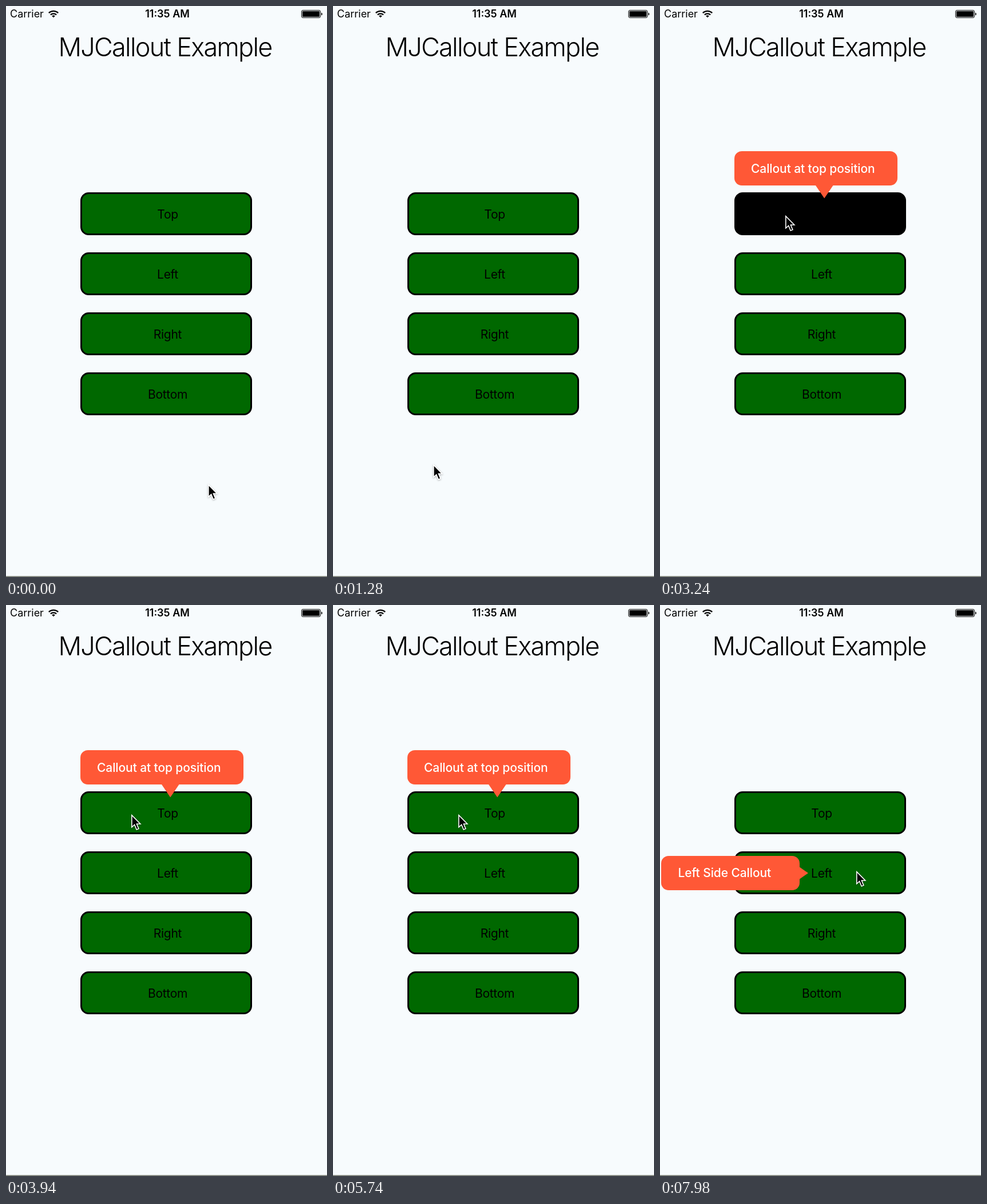
An HTML page that plays this animation: 561x999 px, repeating every 8 s.

```html
<!DOCTYPE html>
<html lang="en">
<head>
<meta charset="utf-8">
<title>Callout example</title>
<style>
  html, body { margin: 0; width: 100%; height: 100%; overflow: hidden; background: #f7fbfd; }
  svg { display: block; width: 561px; height: 999px; }
  text { font-family: Inter, "Open Sans", sans-serif; font-size: 21px; font-optical-sizing: none; }
  .status { font-size: 18px; }
  .time { font-weight: 600; }
  .title { font-size: 45px; font-weight: 300; letter-spacing: -1.7px; }
  .button rect { fill: #006800; stroke: #000; stroke-width: 3; }
  .button text { letter-spacing: -.3px; }
  .button.pressed rect { fill: #000; }
  .middle, .button text { text-anchor: middle; }
  .callout { fill: #ff5836; }
  .callout text { fill: #fff; font-weight: 500; letter-spacing: -.1px; }
  #cursor { filter: drop-shadow(0 1.5px 1.5px rgba(0, 0, 0, .3)); }
</style>
</head>
<body>
<svg viewBox="0 0 561 999">
  <rect width="561" height="999" fill="#f7fbfd"/>
  <rect y="997.5" width="561" height="1.5" fill="#73776c"/>

  <text class="status" x="7" y="20">Carrier</text>
  <g fill="none" stroke="#000" stroke-width="2.3">
    <path d="M74.8 12.2A11.8 11.8 0 0 1 91.2 12.2M77.9 15.4A7.3 7.3 0 0 1 88.1 15.4"/>
    <path d="M83 20.3L80.2 17.5A4 4 0 0 1 85.8 17.5Z" fill="#000" stroke="none"/>
  </g>
  <text class="status time middle" x="282" y="20">11:35 AM</text>
  <rect x="516.5" y="7.5" width="33" height="13" rx="2.5" fill="none" stroke="#000"/>
  <rect x="518" y="9" width="30" height="10" rx="1"/>
  <path d="M551 11.5Q552.8 12 552.8 14T551 16.5Z"/>

  <text class="title middle" x="278" y="88">MJCallout Example</text>
  <g id="buttons"></g>

  <g class="callout" id="topCallout">
    <rect x="130" y="254" width="285" height="60" rx="13"/>
    <path d="M272 314H302.5L287.2 336.5Z"/>
    <text x="159" y="292">Callout at top position</text>
  </g>
  <g class="callout" id="leftCallout">
    <rect x="2" y="439" width="242" height="60" rx="13"/>
    <path d="M244 458.5L259 469L244 479.5Z"/>
    <text x="31.5" y="476">Left Side Callout</text>
  </g>

  <path id="cursor" d="M.8 1.6V22.8L5.6 18.4L9.2 27L12.9 25.4L9.4 17H15.8Z"
        stroke="#fff" stroke-width="1.6"/>
</svg>
<script>
const LOOP = 8000;
const $ = id => document.getElementById(id);

$('buttons').innerHTML = ['Top', 'Left', 'Right', 'Bottom'].map((label, i) =>
  `<g class="button" transform="translate(0 ${i * 105})">
     <rect x="131.5" y="327.5" width="297" height="72" rx="13"/>
     <text x="282.5" y="372">${label}</text>
   </g>`).join('');
const [topButton, leftButton] = $('buttons').children;

// Pointer stops: time, x, y
const path = [
  [0, 353, 836], [300, 353, 836], [830, 315, 848], [1280, 175, 802],
  [1560, 178, 640], [2050, 212, 380], [2300, 216, 363], [2500, 216, 363],
  [2640, 219, 366], [5900, 219, 366], [6250, 262, 400], [6620, 335, 455],
  [6800, 343, 465], [LOOP, 343, 465]
];

const clamp = v => Math.max(0, Math.min(1, v));
const between = (t, start, end) => t >= start && t < end;

function pointerAt(t) {
  const i = path.findIndex(stop => stop[0] > t);
  const [t0, x0, y0] = path[i - 1], [t1, x1, y1] = path[i];
  const k = (t - t0) / (t1 - t0);
  return [x0 + (x1 - x0) * k, y0 + (y1 - y0) * k];
}

function draw(t) {
  $('cursor').setAttribute('transform', `translate(${pointerAt(t)})`);
  topButton.classList.toggle('pressed', between(t, 3100, 3340));
  leftButton.classList.toggle('pressed', between(t, 7060, 7300));
  $('topCallout').style.opacity = t < 7200 ? clamp((t - 3160) / 80) : 0;
  $('leftCallout').style.opacity = clamp((t - 7200) / 80);
}

function tick() {
  draw(performance.now() % LOOP);
  requestAnimationFrame(tick);
}
tick();
</script>
</body>
</html>
```
